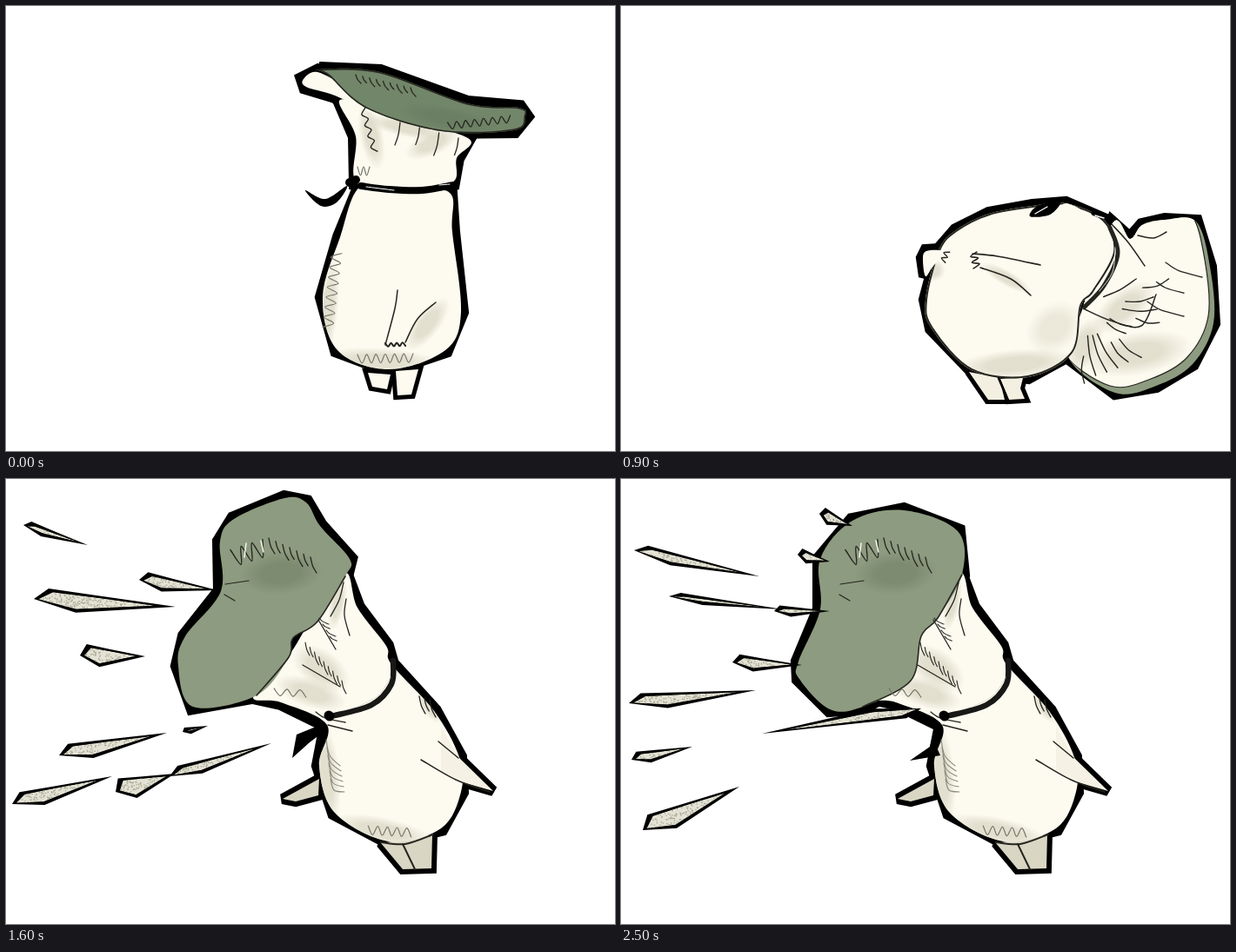
These frames come from a looping animation (700x512 px, 2.6 s). An HTML page with a canvas:

```html
<!DOCTYPE html>
<html lang="en">
<head>
<meta charset="utf-8">
<title>Sneezing mushroom</title>
<style>
html, body { margin: 0; width: 100%; height: 100%; overflow: hidden; background: #fff; }
canvas { display: block; width: 700px; height: 512px; }
</style>
</head>
<body>
<canvas id="stage" width="700" height="512"></canvas>
<script>
const W = 700, H = 512, STEP = 100, COUNT = 26;
const CREAM = '#fdfbf0', SHADE = '#d9d6c4', INK = '#25251f', GREEN = '#8d9b80', DARK_GREEN = '#728669';
let g;

const points = s => s.trim().split(/\s+/).map(p => p.split(',').map(Number));

function random(seed) {
  return () => (seed = (seed * 16807) % 2147483647) / 2147483647;
}

function poly(p) {
  const path = new Path2D();
  p.forEach(([x, y]) => path.lineTo(x, y));
  path.closePath();
  return path;
}

// Smooth line through every point.
function curve(p, closed) {
  const n = p.length, path = new Path2D();
  const at = i => closed ? p[(i + n) % n] : p[Math.max(0, Math.min(n - 1, i))];
  path.moveTo(...p[0]);
  for (let i = 0; i < (closed ? n : n - 1); i++) {
    const [a, b, c, d] = [i - 1, i, i + 1, i + 2].map(at);
    path.bezierCurveTo(b[0] + (c[0] - a[0]) / 6, b[1] + (c[1] - a[1]) / 6,
      c[0] - (d[0] - b[0]) / 6, c[1] - (d[1] - b[1]) / 6, c[0], c[1]);
  }
  if (closed) path.closePath();
  return path;
}

function fill(path, color) {
  g.fillStyle = color;
  g.fill(path);
}

// Angular black rim around a shape.
function rim(s, size) {
  const path = poly(points(s));
  g.save();
  g.lineJoin = 'miter';
  g.miterLimit = 2;
  g.lineWidth = size * 2;
  g.stroke(path);
  g.restore();
}

// Filled smooth shape; paint() draws clipped to it.
function blob(s, color, paint) {
  const path = curve(points(s), true);
  fill(path, color);
  if (!paint) return;
  g.save();
  g.clip(path);
  paint(path);
  g.restore();
}

function stroke(p, width = 1.5, color = INK) {
  g.strokeStyle = color;
  g.lineWidth = width;
  g.stroke(curve(p));
}

const ink = (s, width, color) => s.split('|').forEach(line => stroke(points(line), width, color));

// Soft tinted patch: centre, radii, angle in degrees.
function wash(x, y, rx, ry, angle, color = SHADE, alpha = .75) {
  g.save();
  g.translate(x, y);
  g.rotate(angle * Math.PI / 180);
  g.scale(rx, ry);
  const soft = g.createRadialGradient(0, 0, .45, 0, 0, 1);
  soft.addColorStop(0, color);
  soft.addColorStop(1, color + '00');
  g.globalAlpha = alpha;
  g.fillStyle = soft;
  g.fillRect(-1, -1, 2, 2);
  g.restore();
}

// n short strokes spread from (x, y) to (x2, y2).
function hatch(x, y, x2, y2, n, lx, ly, width = 1.3) {
  for (let i = 0; i < n; i++) {
    const t = i / (n - 1), k = i % 2 ? .75 : 1;
    const a = x + (x2 - x) * t, b = y + (y2 - y) * t;
    stroke([[a, b], [a + lx * k * .35, b + ly * k * .55], [a + lx * k, b + ly * k]], width);
  }
}

// Scribble swinging to both sides of a line.
function scribble(x, y, x2, y2, n, swing, width = 1.2, color = '#77766c') {
  const len = Math.hypot(x2 - x, y2 - y), p = [];
  for (let i = 0; i <= n; i++) {
    const t = i / n, s = (i % 2 ? swing : -swing) / len;
    p.push([x + (x2 - x) * t - (y2 - y) * s, y + (y2 - y) * t + (x2 - x) * s]);
  }
  stroke(p, width, color);
}

// Splinter from its blunt head to its thin tip.
function drop([x, y, x2, y2, w]) {
  const rnd = random(x * 37 + y), dx = x2 - x, dy = y2 - y, len = Math.hypot(dx, dy);
  const put = (t, s) => [x + dx * t - dy / len * s, y + dy * t + dx / len * s];
  const kite = (from, to, half) => poly([put(from, 0), put(from + .1, -half), put(.45, -half * .6),
    put(to, 0), put(.3, half)]);
  fill(kite(0, 1, w / 2), '#000');
  const core = kite(5 / len, .85, w / 2 - 4);
  g.save();
  g.clip(core);
  fill(core, '#e4e2d4');
  g.fillStyle = '#a3a692';
  for (let i = 0; i < len * w / 8; i++) g.fillRect(...put(rnd(), (rnd() - .5) * w), 1.3, 1.3);
  g.restore();
}

function stand() {
  const body = '408,207 384,266 364,335 381,396 440,418 505,396 523,352 513,260 510,215 460,212';
  const neck = '384,108 402,150 403,203 458,209 513,203 518,175 531,152 440,126';
  const lip = '342,84 358,76 392,95 420,122 378,103 345,93';
  const cap = '360,73 430,76 530,112 590,117 597,127 584,143 500,144 415,118 371,80';
  const legs = ['416,422 442,424 438,441 421,438', '448,420 474,418 466,447 450,448'];
  [body, neck, lip, cap].forEach(s => rim(s, 9));
  legs.forEach(s => rim(s, 5));
  legs.forEach(s => fill(poly(points(s)), CREAM));

  blob(neck, CREAM, () => {
    wash(420, 150, 14, 40, -12);
    wash(490, 158, 34, 14, -25);
    wash(460, 140, 50, 11, 12);
  });
  blob(body, CREAM, () => {
    wash(484, 366, 15, 38, 38);
    wash(430, 408, 70, 15, 3);
    wash(370, 350, 12, 60, 6);
  });
  blob(lip, CREAM);
  blob(cap, DARK_GREEN, path => {
    wash(510, 130, 60, 14, 12, '#5f755a', .4);
    g.lineWidth = 3;
    g.strokeStyle = INK;
    g.stroke(path);
  });
  hatch(402, 79, 465, 94, 9, 6, 10);
  scribble(508, 138, 580, 130, 14, 4, 1.3, INK);

  scribble(410, 118, 424, 168, 8, 3, 1.4, INK);
  hatch(453, 134, 520, 152, 4, -6, 26);
  scribble(404, 190, 418, 190, 4, 5, 1.2);
  ink('408,207 440,211 478,212 514,206', 8, '#000');
  ink('414,208 446,212|498,206 510,205', 1, '#fff');
  ink('395,203 402,200', 10, '#000');
  blob('344,212 367,222 392,207 380,226 362,230', '#000');

  scribble(380, 284, 370, 370, 15, 6);
  scribble(404, 406, 468, 405, 12, 5);
  ink('450,327 447,348 436,390|494,341 473,360 459,387');
  scribble(436, 390, 459, 389, 7, 2, 2, INK);
}

function bend() {
  const body = `372,281 392,258 430,239 480,230 518,227 562,246 575,283 550,329 536,345 526,399
    475,427 410,419 364,371 357,338`;
  const hand = '354,290 358,282 373,281 380,286 366,299 357,311';
  const fan = `572,250 592,268 606,252 632,246 668,248 684,300 688,365 664,412 622,437 575,445 522,405 537,350`;
  const legs = ['407,421 442,428 448,453 429,453', '443,429 469,428 466,440 471,452 453,453'];
  [body, hand, fan].forEach(s => rim(s, 8));
  legs.forEach(s => rim(s, 5));
  legs.forEach(s => fill(poly(points(s)), '#f3f0e2'));

  blob(fan, GREEN, path => {
    g.translate(-6, -8);
    fill(path, CREAM);
    g.lineWidth = 1.2;
    g.strokeStyle = INK;
    g.stroke(path);
    g.translate(6, 8);
    fill(poly(points('530,350 575,235 625,300')), CREAM);
    wash(585, 347, 43, 20, -38);
    wash(600, 400, 64, 25, -10);
    wash(540, 390, 18, 34, 25);
  });
  // Gills spread from the pinched neck.
  const rnd = random(29);
  for (let i = 0; i < 13; i++) {
    const angle = -.5 + i * .17, from = 28 + rnd() * 50, to = from + 25 + rnd() * 22;
    const at = (r, bow) => [537 + r * Math.cos(angle + bow), 348 + r * Math.sin(angle + bow)];
    stroke([at(from, 0), at((from + to) / 2, .04), at(to, 0)], 1.4);
  }
  hatch(633, 295, 612, 340, 3, 42, 17);
  ink('538,348 570,362 605,368 622,332|601,264 619,267 634,260|571,251 590,272 609,299');

  blob(body, CREAM, path => {
    wash(450, 313, 33, 9, 30);
    wash(505, 370, 36, 28, -38, SHADE, .5);
    wash(460, 412, 72, 17, -5);
    wash(366, 304, 14, 13, 0);
    g.lineWidth = 4;
    g.strokeStyle = INK;
    g.stroke(path);
  });
  blob(hand, CREAM);
  scribble(382, 282, 377, 294, 4, 3, 1.5, INK);
  ink('569,255 578,285 562,322 540,346', 5);
  ink('575,278 572,306 557,328', .8, '#fff');
  blob('477,242 486,230 512,225 500,240', '#000');
  ink('483,239 497,231', 1.3, '#fff');
  blob('507,238 518,227 536,236', CREAM);
  ink('551,238 562,242', 7, '#000');
  ink('552,241 562,244', 1.4, '#fff');

  scribble(412, 284, 416, 301, 5, 4, 1.6, INK);
  ink('411,285 440,288 489,298|420,301 455,314 478,333', 1.6);
  ink('441,428 452,454', 2.6, '#000');
}

// The body is shared; cap, rim line, loose knot end and splinters vary.
function sneeze(cap, edge, tail, drops) {
  const body = `389,108 404,148 437,192 443,213 492,267 521,320 523,360 500,402 440,417 378,384 360,330
    369,283 316,257 284,250 325,203 347,168`;
  const arms = ['318,368 360,345 359,364 333,371', '500,285 520,320 560,359 525,349 500,336'];
  const legs = '431,419 490,409 489,448 456,449';
  [cap, body].forEach(s => rim(s, 9));
  [...arms, legs].forEach(s => rim(s, 6));
  fill(poly(points(legs)), SHADE);
  blob(body, CREAM, () => {
    wash(362, 218, 38, 22, 35);
    wash(350, 246, 43, 17, 18);
    wash(381, 143, 9, 32, 12);
    wash(369, 341, 15, 62, -5);
    wash(433, 405, 60, 16, 12);
    wash(487, 261, 10, 23, -32);
  });
  arms.forEach((s, i) => fill(poly(points(s)), [SHADE, '#f5f2e5'][i]));
  ink('477,323 517,346 556,360|497,302 520,321');
  hatch(475, 250, 487, 254, 3, 7, 20);
  ink('431,418 459,420 491,409|456,420 470,449', 2);

  blob(cap, GREEN, () => wash(316, 108, 48, 25, -5, '#7a896e', .85));
  ink(edge, 1.6);
  scribble(261, 91, 298, 79, 6, 10, 1.4, INK);
  hatch(302, 68, 350, 90, 7, 7, 18);
  ink('276,74 274,90|293,71 296,84', 1.5, '#f5f6ee');
  ink('252,121 279,117|251,133 263,140', 1.2);

  hatch(360, 160, 372, 181, 4, 11, 7, 1.1);
  hatch(344, 188, 386, 232, 9, 5, 15, 1.1);
  ink('388,119 383,139 373,158|391,138 389,157 395,180|359,162 379,196|341,214 384,239', 1.3);
  scribble(308, 245, 345, 247, 5, 4);
  ink('445,209 443,236 420,260 374,273', 6.5, '#181816');
  ink('442,228 428,249 404,262', .8, '#d8d6cc');
  ink('356,268 367,275 390,280|370,283 398,290', 1.3);
  ink('371,272 372,273', 11, '#000');
  ink('361,274 366,278', 1.8, '#fff');
  fill(poly(points(tail)), '#000');
  for (let i = 0; i < 6; i++) ink(`${368 + i},${300 + i * 9} ${372 + i},${318 + i * 8} ${384 + i},${330 + i * 6}`, 1.1, '#8a897e');
  scribble(416, 404, 466, 407, 9, 5);
  drops.forEach(drop);
}

function sneezeWide() {
  sneeze(`266,48 325,36 387,60 392,110 364,160 345,181 333,232 278,262 240,265 205,230 204,210 229,150 229,92`,
    '392,110 364,160 345,181 333,232 278,262', '361,284 368,290 363,309 367,318 332,324 355,308',
    [[15, 82, 159, 112, 17], [55, 135, 186, 150, 11], [176, 152, 240, 152, 13], [128, 211, 208, 214, 19],
      [9, 258, 155, 243, 20], [12, 323, 82, 308, 16], [25, 404, 136, 354, 28], [345, 264, 162, 293, 17],
      [228, 40, 266, 54, 18], [203, 87, 240, 95, 16]]);
}

function sneezeTall() {
  sneeze(`262,46 320,22 345,27 361,54 395,92 390,112 358,164 330,183 325,205 288,249 215,262 198,215 206,181
    247,129 246,72`,
    '390,112 358,164 330,183 325,205 288,249', '366,281 369,288 349,303 329,321 334,294',
    [[20, 53, 94, 76, 13], [32, 138, 195, 147, 26], [85, 203, 160, 204, 26], [153, 116, 243, 128, 20],
      [61, 318, 185, 292, 22], [203, 291, 232, 284, 9], [7, 374, 122, 342, 22], [126, 360, 194, 339, 28],
      [188, 342, 305, 304, 17]]);
}

function render(draw) {
  const c = document.createElement('canvas');
  c.width = W;
  c.height = H;
  g = c.getContext('2d');
  g.lineCap = g.lineJoin = 'round';
  draw();
  return c;
}

const [STAND, BEND, WIDE, TALL] = [stand, bend, sneezeWide, sneezeTall].map(render);
const stage = document.getElementById('stage').getContext('2d');

// Lean over, tremble while bent, then sneeze.
function pose(i) {
  const odd = i % 2, t = (i / 2) ** 1.6;
  if (i < 3) return { art: STAND, lean: 18 * t, squash: 1 - .2 * t };
  if (i < 10) return { art: BEND, shift: odd ? -7 : 0 };
  return { art: odd ? WIDE : TALL };
}

let last = -1;
function show(i) {
  if (i === last) return;
  last = i;
  const { art, shift = 0, lean = 0, squash = 1 } = pose(i);
  stage.setTransform(1, 0, 0, 1, 0, 0);
  stage.fillStyle = '#fff';
  stage.fillRect(0, 0, W, H);
  stage.translate(447 + shift, 450);
  stage.rotate(lean * Math.PI / 180);
  stage.scale(1, squash);
  stage.drawImage(art, -447, -450);
}

const start = performance.now();
function tick(now) {
  show(Math.floor(Math.max(0, now - start) / STEP) % COUNT);
  requestAnimationFrame(tick);
}
show(0);
requestAnimationFrame(tick);
</script>
</body>
</html>
```
